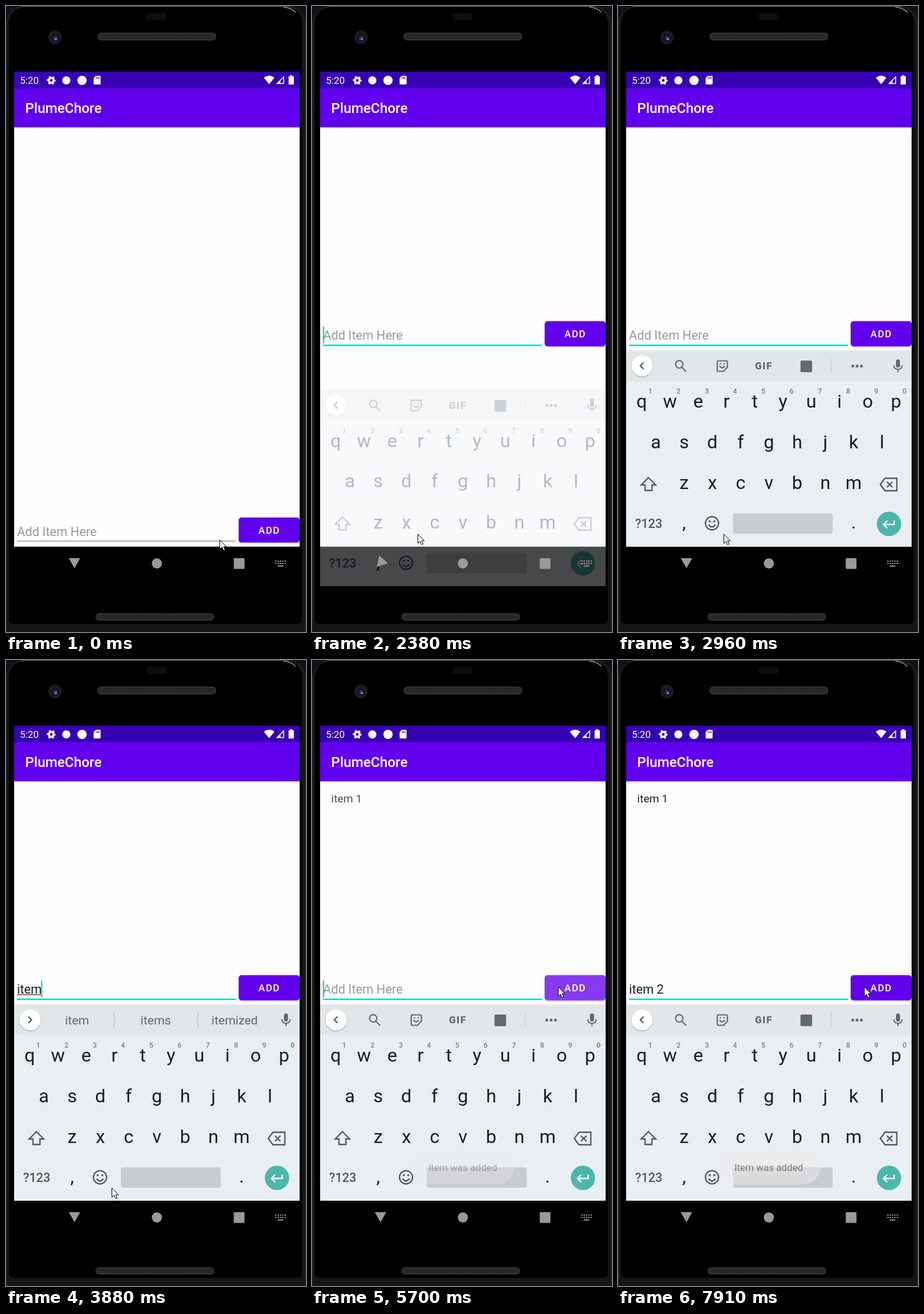
Write an HTML page that moves like this. It is 517 by 1077 pixels and loops after 8000 ms.

```html
<!DOCTYPE html>
<html lang="en">
<head>
<meta charset="utf-8">
<title>To-do list demo</title>
<style>
  html, body { margin: 0; width: 100%; height: 100%; overflow: hidden; background: #000; }
  svg { display: block; width: 100vw; height: 100vh; }
  text { font-family: Roboto, "Noto Sans", sans-serif; white-space: pre; }
  .mid { text-anchor: middle; }
  .medium { font-weight: 500; }
  .line { fill: none; stroke: #4b5b63; stroke-width: 2.3; }
  #letters { font-size: 32px; fill: #0a222d; }
  #digits { font-size: 12.5px; font-weight: 500; fill: #78848a; }
  #words { font-size: 21px; fill: #5c686e; }
  #tools { fill: #5f6b71; }
  #tools .line { stroke: #5f6b71; stroke-width: 2.2; }
</style>
</head>
<body>
<svg viewBox="0 0 517 1077" preserveAspectRatio="none">
  <defs>
    <pattern id="mesh" width="3" height="3" patternUnits="userSpaceOnUse">
      <rect width="3" height="3" fill="#202020"/><circle cx="1.5" cy="1.5" r=".9" fill="#3b3b39"/>
    </pattern>
    <filter id="soft" x="-20%" y="-20%" width="140%" height="160%">
      <feDropShadow dx="0" dy="1.2" stdDeviation="1.2" flood-opacity=".3"/>
    </filter>
  </defs>

  <!-- phone -->
  <rect width="517" height="1077" fill="#10111a"/>
  <rect x=".5" y=".5" width="516" height="1100" rx="34" fill="#161616" stroke="#333"/>
  <path d="M5 32Q5 2 35 2H480Q510 2 510 32V1055Q510 1063 502 1063H13Q5 1063 5 1055z"/>
  <path d="M26 .7H488" stroke="#666"/>
  <path d="M478 2Q492 3 499 11" fill="none" stroke="#8a8a8a" stroke-width="1.6"/>
  <rect x="242" y="12" width="35" height="12" rx="5" fill="#0e0e0e"/>
  <circle cx="84.5" cy="54" r="11.5" fill="#1d1d20"/>
  <circle cx="84.5" cy="54.5" r="7" fill="#10141f"/>
  <circle cx="85" cy="55.5" r="3.8" fill="#28376c"/>
  <circle cx="86" cy="57" r="1.6" fill="#8fa5e6"/>
  <g fill="url(#mesh)" stroke="#4a4a48">
    <rect x="158.5" y="46.5" width="203" height="12" rx="5"/>
    <rect x="155" y="1045.5" width="203" height="11" rx="5"/>
  </g>

  <!-- app -->
  <rect x="14" y="113" width="492" height="817.2" fill="#fefefe"/>
  <rect x="14" y="141" width="492" height="67.8" fill="#6200ee"/>
  <rect x="14" y="113" width="492" height="28.7" fill="#3700b3"/>
  <g fill="#fff">
    <text x="24" y="134" font-size="16.75">5:20</text>
    <circle cx="78" cy="128" r="4.2" fill="none" stroke="#fff" stroke-width="3.6"/>
    <circle cx="78" cy="128" r="6.3" fill="none" stroke="#fff" stroke-width="2.6" stroke-dasharray="3.3" stroke-dashoffset="1.65"/>
    <circle cx="104" cy="128" r="7"/>
    <circle cx="131" cy="128" r="8"/>
    <path d="M155 120h6.500q1.500 0 1.500 1.500v12q0 1.500-1.500 1.500h-9q-1.500 0-1.500-1.500V124z"/>
    <path d="M155.500 122.500v3m2.500-3v3m2.500-3v3" stroke="#3700b3" stroke-width="1.3"/>
    <path d="M444.500 123.500q9-7.500 18 0L453.500 134.500z"/>
    <path d="M467 133.500H478.500V122z" fill="none" stroke="#fff" stroke-width="1.5"/>
    <path d="M466 134H473V127z"/>
    <path d="M487 121h2.500v-2h4v2h2.500v14h-9z"/>
    <text class="medium" x="33" y="184" font-size="23.9">PlumeChore</text>
  </g>
  <text id="item" x="33" y="245" font-size="19.1" fill="#212121">item 1</text>

  <g id="form">
    <text id="hint" x="19" y="911.5" font-size="21.5" fill="#9a9a9a">Add Item Here</text>
    <text id="field" x="19" y="911.5" font-size="21.5" fill="#1c1c1c"></text>
    <rect id="under" x="19" y="913" height="1.2" fill="#1c1c1c"/>
    <rect id="rule" x="19" width="377"/>
    <rect id="caret" y="889" width="2.3" height="29" fill="#03dac5"/>
    <rect x="401" y="880" width="105" height="43.1" rx="4.8" fill="#6200ee" filter="url(#soft)"/>
    <rect id="ripple" x="401" y="880" width="105" height="43.1" rx="4.8" fill="#fff"/>
    <text class="medium" x="435" y="907.7" font-size="16.75" letter-spacing="1.5" fill="#fff">ADD</text>
  </g>

  <!-- keyboard -->
  <g id="board">
    <rect x="14" y="645" width="492" height="285.2" fill="#e9eef1"/>
    <rect x="14" y="592.5" width="492" height="53" fill="#e2e6e8"/>
    <circle cx="41.5" cy="619" r="18" fill="#fff" filter="url(#soft)"/>
    <path id="chevron" class="line"/>
    <g id="tools">
      <circle class="line" cx="105.5" cy="616.5" r="6.3"/>
      <path class="line" d="M110 621.500L117.500 629"/>
      <path class="line" d="M173 610.500h13.500q2 0 2 2v9l-6.500 7h-9q-2 0-2-2v-14q0-2 2-2z"/>
      <path class="line" d="M175 619.500q4.500 6 9 0"/>
      <circle cx="176.5" cy="615.5" r="1.3"/><circle cx="183" cy="615.5" r="1.3"/>
      <text x="236" y="625" font-size="17" font-weight="800" letter-spacing="1.5">GIF</text>
      <rect x="314.5" y="610" width="20" height="20" rx="2"/>
      <path d="M367.500 606v26" stroke="#cbd0d3" stroke-width="1.5"/>
      <circle cx="404.5" cy="619.5" r="2.5"/><circle cx="412" cy="619.5" r="2.5"/><circle cx="419.5" cy="619.5" r="2.5"/>
    </g>
    <g id="words">
      <path d="M186.500 605.500v28M330.500 605.500v28" stroke="#c6cbce" stroke-width="1.8"/>
      <text class="mid" x="122.5" y="627"></text>
      <text class="mid" x="258" y="627"></text>
      <text class="mid" x="394" y="627"></text>
    </g>
    <rect x="479" y="608" width="7" height="14" rx="3.5" fill="#5f6b71"/>
    <path class="line" d="M475.500 618q0 7 7 7t7-7M482.500 625v5" style="stroke:#5f6b71;stroke-width:2"/>
    <g id="letters"></g>
    <g id="digits"></g>
    <path class="line" d="M52.500 811.500L65 824h-6.500v9.500h-12V824H40z"/>
    <path class="line" d="M460 812.500h20.500v21.500H460L452 823.200zM463.500 818.500l9.500 9.500m0-9.500l-9.500 9.500"/>
    <text class="mid medium" x="53" y="898" font-size="21.5" fill="#4b5b63">?123</text>
    <circle class="line" cx="162" cy="890" r="11.3"/>
    <path class="line" d="M156 892.500q6 7.500 12 0"/>
    <circle cx="158" cy="886.5" r="1.8" fill="#4b5b63"/><circle cx="166" cy="886.5" r="1.8" fill="#4b5b63"/>
    <rect x="198" y="873" width="172" height="35" rx="4" fill="#c8ccd0"/>
    <circle cx="467" cy="891" r="21" fill="#4db6ac"/>
    <path d="M476 885.500v6.500h-18.500m6.500-6.500l-6.500 6.500 6.500 6.500" fill="none" stroke="#fff" stroke-width="2.4"/>
  </g>

  <g id="toast">
    <rect x="172" y="845" width="176" height="57" rx="28.5" fill="#ebebeb"/>
    <text x="200.5" y="879" font-size="16.75" fill="#1f1f1f">Item was added</text>
  </g>

  <!-- navigation -->
  <g fill="#999">
    <path id="back" d="M109 950.500h18L118 966.500z" stroke="#999" stroke-linejoin="round"/>
    <circle cx="260" cy="959" r="8.7"/>
    <rect x="392.5" y="950" width="18.5" height="18.5" rx="1.5"/>
    <path d="M464 955h18.500M464 959h18.500" stroke="#999" stroke-width="2" stroke-dasharray="2.3 1.75"/>
    <rect x="468" y="962.5" width="10" height="2"/>
  </g>
  <path id="mouse" d="M.5.5V16.500L4.200 13 7 18.800 9.500 17.600 6.900 12H11.700z" fill="#fff" stroke="#000"/>
</svg>

<script>
const LOOP = 8000;
// The screen is only refreshed at these moments.
const ticks = [0, 120, 250, 390, 1660, 1810, 1950, 2090, 2240, 2380, 2530, 2660, 2960,
  3360, 3530, 3700, 3880, 4440, 4580, 4720, 4850, 4990, 5130, 5260, 5400,
  5550, 5700, 5850, 5980, 6120, 6550, 6700, 6850, 7250, 7370, 7640, 7770, 7910];
const typing = [[2240, ""], [3360, "i"], [3530, "it"], [3700, "ite"], [3880, "item"],
  [4440, "item "], [4720, "item 1"], [5550, ""], [6550, "i"], [6700, "it"],
  [6850, "item"], [7250, "item "], [7370, "item 2"]];
// A star marks the automatic correction.
const guesses = {
  "i": ["i", "*I", "I'm"], "it": ["it", "it's", "its"], "ite": ["ite", "*item", "items"],
  "item": ["item", "items", "itemized"], "item ": ["is", "in", "and"]
};
const moves = [[0, 390, 400, 1033], [1660, 2240, 182, 908], [4720, 5400, 424, 562]];

const $ = id => document.getElementById(id);
const set = (id, attrs) => { for (const k in attrs) $(id).setAttribute(k, attrs[k]); };
const show = (id, on) => set(id, { visibility: on ? "visible" : "hidden" });
const clamp = v => Math.max(0, Math.min(1, v));
const ease = v => v * v * (3 - 2 * v);

// Lays out keys evenly on both sides of the middle x.
function row(id, chars, y, x = 260) {
  $(id).innerHTML += [...chars].map((c, i) =>
    `<text class="mid" x="${x + 48.7 * (i - (chars.length - 1) / 2)}" y="${y}">${c}</text>`).join("");
}
row("letters", "qwertyuiop", 691);
row("letters", "asdfghjkl", 760.5);
row("letters", "zxcvbnm", 831);
row("letters", ",", 899, 114);
row("letters", ".", 899, 406);
row("digits", "1234567890", 667, 274.7);

function drawForm(t) {
  const focused = t >= 2240;
  const [since, text] = typing.findLast(e => e[0] <= t) || [0, ""];
  const words = guesses[text];
  $("field").textContent = text;
  const width = text ? $("field").getComputedTextLength() : 0;

  set("form", { transform: `translate(0 ${t >= 2290 ? -337.7 : 0})` });
  show("hint", !text);
  show("under", words && !text.endsWith(" "));
  set("under", { width });
  set("rule", focused ? { y: 920.2, height: 2.6, fill: "#18d5c8" }
                      : { y: 920, height: 1.1, fill: "#777" });
  show("caret", focused && (t - since) % 1000 < 500);
  set("caret", { x: 18.7 + Math.max(0, width - 1) });
  set("ripple", { opacity: Math.max(0, 0.23 - Math.abs(t - 5700) * 0.0009) });

  show("tools", !words);
  show("words", words);
  set("chevron", { d: words ? "M38.500 613.500l5.500 5.500-5.500 5.500" : "M44 613.500l-5.500 5.500 5.500 5.500" });
  if (words) $("words").querySelectorAll("text").forEach((el, i) => {
    const bold = words[i][0] === "*";
    el.textContent = words[i].replace("*", "");
    el.style.fontWeight = bold ? 700 : 400;
    el.style.fill = bold ? "#0a1a22" : "";
  });
}

function draw(now) {
  const t = ticks.findLast(v => v <= now % LOOP);
  drawForm(t);

  const rise = clamp((t - 2290) / 300);
  set("board", { transform: `translate(0 ${97 * (1 - rise)})`, opacity: rise });
  $("board").style.display = rise ? "" : "none";
  const turn = rise > 0 ? 60 * (1 - rise) : 0;
  set("back", { transform: `rotate(${turn} 118 958)` });

  set("item", { opacity: clamp((t - 5550) / 188) });
  set("toast", { opacity: Math.min(clamp((t - 5600) / 350), clamp(1 - (t - 7710) / 400)) });

  let x = 368, y = 918;
  for (const [from, to, x1, y1] of moves) {
    const p = ease(clamp((t - from) / (to - from)));
    x += (x1 - x) * p;
    y += (y1 - y) * p;
  }
  set("mouse", { transform: `translate(${x} ${y})` });
}

let start;
function loop(now) {
  start ??= now;
  draw(now - start);
  requestAnimationFrame(loop);
}
draw(0);
requestAnimationFrame(loop);
</script>
</body>
</html>
```
